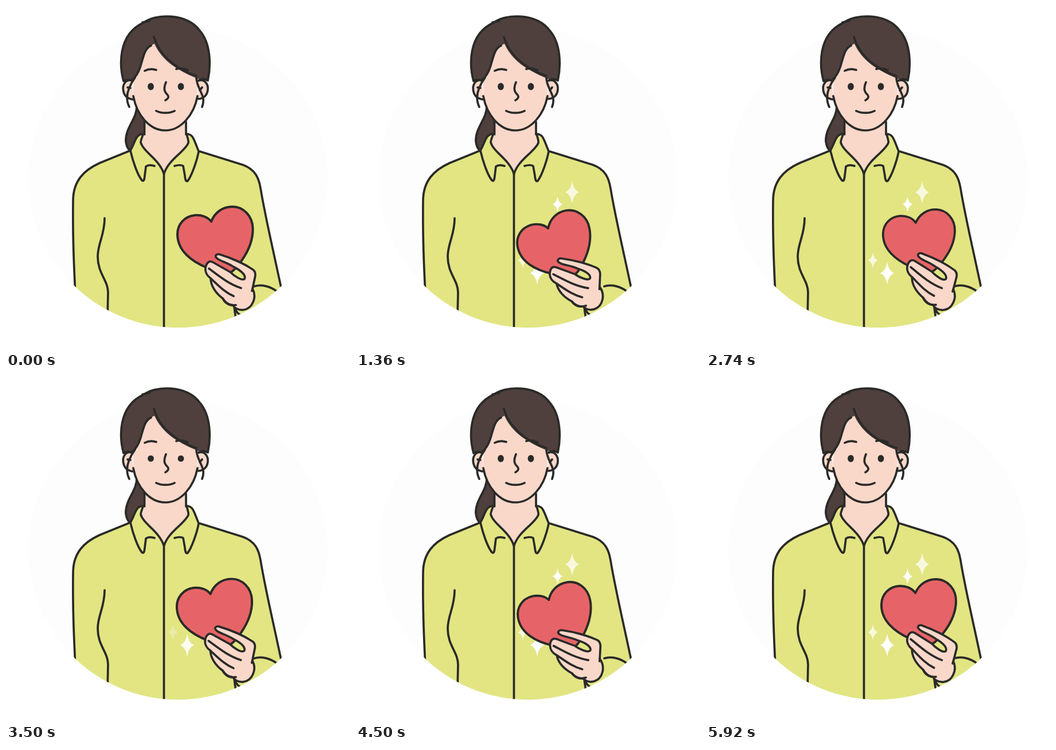
An HTML page that plays this animation: 600x600 px, repeating every 6000 ms.

```html
<!DOCTYPE html>
<html lang="en">
<head>
<meta charset="utf-8">
<title>Woman holding a heart</title>
<style>
  html, body { margin: 0; width: 100%; height: 100%; overflow: hidden; background: #fff; }
  svg { display: block; width: 100vw; height: 100vh; }
  .ink { stroke: #2a2a28; stroke-width: 3.7; stroke-linecap: round; stroke-linejoin: round; fill: none; }
  .shirt { fill: #e2e582; }
  .skin { fill: #f9d8ca; }
  .hair { fill: #4f403d; }
  .red { fill: #e66467; }
</style>
</head>
<body>
<svg viewBox="0 0 600 600">
  <defs>
    <clipPath id="disc"><circle cx="300" cy="300" r="261"/></clipPath>
  </defs>
  <circle cx="300" cy="300" r="261" fill="#fdfdfd"/>

  <!-- ponytail and neck -->
  <path class="ink hair" d="M228 174C229 196 208 212 209 236C210 245 213 250 217 253L243 226V190Z"/>
  <path class="skin" d="M241 190V223L235 238C241 256 268 268 275.5 292C283 268 310 256 318 239L314 223V190Z"/>
  <path class="ink" d="M241.5 200V224M314 202V224"/>

  <!-- shirt -->
  <g clip-path="url(#disc)">
    <path class="ink shirt" d="M125 580C119 470 116 410 117 340C117 304 137 286 163 274L217 252C226 236 226 224 239 223C238 229 235 233 235 238C240 255 268 268 275.5 293C283 268 311 255 318 239C319 234 316 229 315 223C327 224 327 232 336 253L413 277C435 285 441 300 444 318C454 379 471 445 491 545V600H125Z"/>
    <path class="ink" d="M217 252C221 270 229 294 237 304Q241 308 242 296L244 280Q249 276 259 279M336 254C333 270 324 296 317 305Q313 308 312 296L309 279Q304 276 294 279M275.5 290V570"/>
    <path class="ink" d="M172 370C172 400 160 414 160 437C160 467 178 478 178 500L177 545"/>
    <path class="ink" d="M433 489C446 485 461 489 473 498M398 524Q399 534 401 545M400 529Q403 536 409 539"/>
  </g>

  <!-- head -->
  <path class="ink skin" d="M220 130C208 127 203 138 204.5 147C206 157 212 162 222 163"/>
  <path class="ink skin" d="M336 130C347 127 353 137 352 146C351 156 344 162 335 162"/>
  <path class="skin" d="M222 122V157C228 190 250 217 278 217C305 217 328 190 334 157V122L262 50Z"/>
  <path class="ink" d="M222 157C228 190 250 217 278 217C305 217 328 190 334 157"/>
  <path class="hair" d="M205 131C198 105 194 50 240 29C262 13 315 12 338 43C357 65 358 103 352 130C344 126 338 130 332 126C300 112 273 97 259 66Q256 67 253 69C241 74 239 92 234 107C230 119 224 126 218 130Q211 127 205 131Z"/>
  <path class="ink" d="M253 69C241 74 239 92 234 107C230 119 224 126 219 130Q211 127 205 131C198 105 194 50 240 29C262 13 315 12 338 43C357 65 358 103 352 130Q344 125 336 130M258 54C269 92 306 114 332 122M238 28.5L250 26"/>
  <path class="ink" d="M225 125C212 143 207 160 215 176M332 126C334 148 350 156 342 176M212 142L217 143M338 147L342 142"/>
  <path class="ink" d="M242 113Q251 108 262 111.5M297 110Q307 107 317 112M279 133C275 142 276 149 280 153C284 157 285 160 278 164.5M262 183C270 187.500 286 187.500 294 183"/>
  <g fill="#2a2a28">
    <ellipse class="eye" cx="252.5" cy="140.5" rx="5.4" ry="6.2"/>
    <ellipse class="eye" cx="305" cy="140.5" rx="5.4" ry="6.2"/>
  </g>

  <g id="stars" fill="#fff"></g>

  <g id="arm">
    <path id="heart" class="ink red" style="stroke-width:4" d="M358 376C352 368 341 364 329 365C311 367 299 381 299 398C299 427 324 446 352 457C366 462 379 465 391 465.5C399 460 406 452 411 444C423 427 431 409 430.5 388C430 366 414 350 395 350C378 350 364 360 358 376Z"/>
    <path class="ink skin" d="M372 433C395 440 418 451 431 460Q436 464 434.5 472L430 493C438 508 430 528 414 530C404 531 398 526 396 522C388 522 381 517 378 510C366 501 357 488 357 475C350 470 347 463 348 457C349 449 354 443 361 447L391 464C397 470 411 480 416 476C419 470 411 462 397 455C385 447 373 445 368 440C363 436 367 432 372 433Z"/>
    <path class="ink" d="M354 458C368 468 386 484 410 492M357 475C370 487 381 499 397 506M378 510Q387 524 401 521.5M430 493L429 497"/>
  </g>
</svg>
<script>
  const CYCLE = 3000, LAST = 2920, STEP = 20;
  const BEAT = 477, SHRINK = 0.097;
  const WRIST = [408, 522], TIP = [379, 457];

  const stars = [
    { x: 316, y: 466, size: 1, alpha: 1, delay: 150 },
    { x: 291, y: 443.5, size: 0.7, alpha: 0.72, delay: 300 },
    { x: 351.5, y: 346, size: 0.7, alpha: 1, delay: 520 },
    { x: 377, y: 325, size: 1, alpha: 0.72, delay: 590 }
  ];

  // Cosine ease from 0 to 1 between times a and b.
  const ease = (t, a, b) => {
    const u = Math.min(Math.max((t - a) / (b - a), 0), 1);
    return (1 - Math.cos(Math.PI * u)) / 2;
  };
  const sway = t => -9.6 * ease(t, 330, 1400) + 12.3 * ease(t, 1400, 2125);
  const pulse = t => 1 - SHRINK * (1 - Math.cos(2 * Math.PI * t / BEAT)) / 2;
  const blink = (t, mid) => ease(t, mid - 130, mid) - ease(t, mid, mid + 130);
  const lid = t => 1 - 0.9 * (blink(t, 400) + blink(t, 2520));

  const scaleAbout = (x, y, sx, sy) =>
    `translate(${x} ${y}) scale(${sx} ${sy}) translate(${-x} ${-y})`;

  function addStar({ x, y, size }) {
    const p = document.createElementNS("http://www.w3.org/2000/svg", "path");
    p.setAttribute("d", "M0 -19.5Q2.4 -4 12 0Q2.4 4 0 19.5Q-2.4 4 -12 0Q-2.4 -4 0 -19.5Z");
    p.setAttribute("transform", `translate(${x} ${y}) scale(${size})`);
    return document.getElementById("stars").appendChild(p);
  }

  const starNodes = stars.map(addStar);
  const arm = document.getElementById("arm");
  const heart = document.getElementById("heart");
  const eyes = document.querySelectorAll(".eye");

  function draw(now) {
    const t = Math.min(Math.floor((now % CYCLE) / STEP) * STEP, LAST);
    const s = pulse(t);
    arm.setAttribute("transform", `rotate(${sway(t)} ${WRIST})`);
    heart.setAttribute("transform", scaleAbout(...TIP, s, s));
    eyes.forEach(e => e.setAttribute("transform",
      scaleAbout(e.cx.baseVal.value, e.cy.baseVal.value, 1, lid(t))));
    stars.forEach(({ alpha, delay }, i) =>
      starNodes[i].setAttribute("opacity", alpha * ease(t, delay, delay + 450)));
  }

  const start = performance.now();
  function tick() {
    draw(performance.now() - start);
    requestAnimationFrame(tick);
  }
  tick();
</script>
</body>
</html>
```
